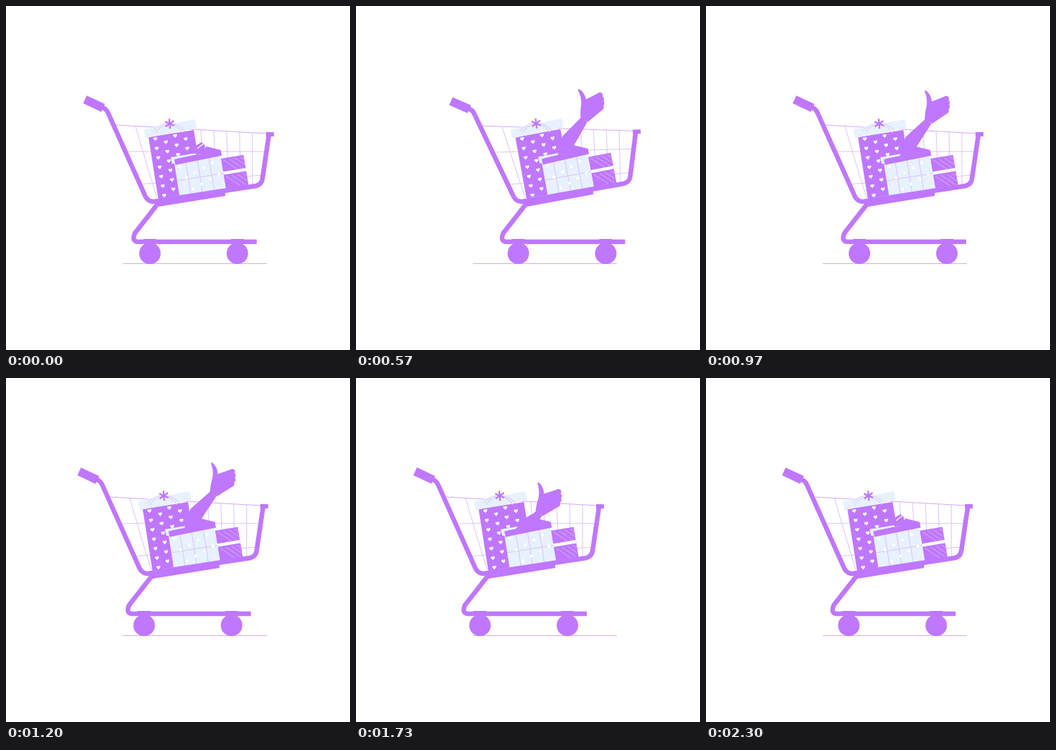
An HTML page with a canvas that plays this animation: 480x480 px, repeating every 2330 ms.

```html
<!DOCTYPE html>
<html lang="en">
<head>
<meta charset="utf-8">
<title>Shopping cart</title>
<style>
  html, body { margin: 0; width: 100%; height: 100%; overflow: hidden; background: #fff; }
  canvas { display: block; width: 100vw; height: 100vh; }
</style>
</head>
<body>
<canvas id="stage" width="480" height="480"></canvas>
<script>
const LOOP = 2330;
const LEFT_STOP = 169, ROLL = 60.3, ROLL_BACK = 661, ROLL_OUT = 1606;
const PURPLE = '#bf77ff', PALE = '#e7f1ff', LILAC = '#dcc4fb', WIRE = '#d5a8fd', WHITE = '#fff';
const ctx = document.getElementById('stage').getContext('2d');

// Motion

const progress = (t, start, end) => Math.min(1, Math.max(0, (t - start) / (end - start)));
const smooth = u => u * u * (3 - 2 * u);
const mix = (a, b, u) => a + (b - a) * u;
const bump = (t, peak, reach) =>
  Math.abs(t - peak) < reach ? Math.cos((t - peak) / reach * Math.PI / 2) ** 2 : 0;

function cartX(t) {
  if (t >= ROLL_BACK && t < ROLL_OUT)
    return LEFT_STOP + ROLL * (1 - smooth(progress(t, ROLL_BACK, ROLL_OUT)));
  const u = progress(t < ROLL_BACK ? t + LOOP : t, ROLL_OUT, LOOP + ROLL_BACK);
  return LEFT_STOP + ROLL * mix(u, smooth(u), 0.35);
}

const cartTilt = t => 2.8 * bump(t, 1970, 260) - 1.35 * bump(t, 570, 240);
const cartDip = t => 1.4 * bump(t, 330, 220);
const armSink = t =>
  1 - smooth(progress(t, 60, 280)) - 0.03 * bump(t, 330, 150) + smooth(progress(t, 1650, 1900));
const armSwing = t => mix(-4, 5, smooth(progress(t, 300, 1500)));

// Drawing helpers

function fill(d, color = PURPLE) {
  ctx.fillStyle = color;
  ctx.fill(new Path2D(d));
}

function stroke(d, width = 1, color = LILAC) {
  ctx.strokeStyle = color;
  ctx.lineWidth = width;
  ctx.stroke(new Path2D(d));
}

function line(x1, y1, x2, y2, width, color) {
  stroke(`M${x1} ${y1} L${x2} ${y2}`, width, color);
}

function rect(x, y, w, h, color = PURPLE) {
  ctx.fillStyle = color;
  ctx.fillRect(x, y, w, h);
}

function disc(x, y, r, color = PURPLE) {
  ctx.fillStyle = color;
  ctx.beginPath();
  ctx.arc(x, y, r, 0, Math.PI * 2);
  ctx.fill();
}

function placed(x, y, degrees, paint) {
  ctx.save();
  ctx.translate(x, y);
  ctx.rotate(degrees * Math.PI / 180);
  paint();
  ctx.restore();
}

function turnAround(x, y, degrees) {
  ctx.translate(x, y);
  ctx.rotate(degrees * Math.PI / 180);
  ctx.translate(-x, -y);
}

function heart(x, y) {
  disc(x - 1.3, y - 0.8, 1.5, WHITE);
  disc(x + 1.3, y - 0.8, 1.5, WHITE);
  fill(`M${x - 2.6} ${y - 0.2} h5.2 l-2.6 3 Z`, WHITE);
}

// Cart

function drawBase() {
  stroke('M211 276 L179 317 Q174 329 184 329 H349', 6.5, PURPLE);
  for (const x of [200, 322]) {
    rect(x - 9, 325, 18, 7);
    disc(x, 345.2, 15);
  }
}

function drawWires() {
  line(152, 166, 364, 178, 1, WIRE);
  line(169, 203, 361, 203);
  line(188, 248.5, 358, 236);
  stroke('M180 168 Q192 210 210 268');
  for (let i = 0; i < 5; i++) line(271 + 18 * i, 173 + i, 277 + 16.5 * i, 260 - 2.5 * i);
}

function drawFrame() {
  stroke('M131 141 Q139 142 142 150 L192 262 Q196 273 205 273 L348 251 Q356 249 357 241 L366 180', 6.5, PURPLE);
  rect(362, 176, 11, 6);
  fill('M206 270 L305 256 V265 L212 280 Z');
  placed(122, 136.3, 25, () => rect(-14, -6, 28, 12));
}

// Gifts

function drawHeartBox() {
  placed(198, 183, -9, () => {
    rect(0, 0, 64, 87);
    for (let col = 0; col < 4; col++)
      for (let y = 4 + (col % 2) * 6.7; y < (col < 2 ? 84 : 32); y += 13.3) heart(9 + col * 14, y);
  });
  placed(191.5, 172, -11, () => rect(0, 0, 73, 12.5, PALE));
  for (const side of [-1, 1]) {
    stroke(`M227 165 q${side * 13} 2 ${side * 19} 12`);
    stroke(`M227 165 q${side * 11} -3 ${side * 23} 10`);
  }
  for (let i = 0; i < 6; i++) placed(227.5, 164.3, 60 * i + 25, () => line(0, 0, 7, 0, 2.3, PURPLE));
}

function drawArm(sink, swing) {
  if (sink > 0.98) return;
  ctx.save();
  ctx.clip(new Path2D('M190 40 H420 L303 203 L234 215 Z'));
  ctx.translate(-60 * sink, 110 * sink);
  turnAround(272, 205, swing * 0.4);
  fill('M291 158 L264 183 L255 215 H274 L278 199 L300 164 Z');
  turnAround(296, 160, swing * 0.6);
  fill('M290.5 159 Q291 146 293 139 Q294 129 290 120 Q289 116 293 119 Q299 124 300 133 L319 125 L322 149 L301 164 Z');
  for (let i = 0; i < 4; i++) disc(320 + 1.5 * Math.sin(i), 128.5 + 5.6 * i, 3.8);
  ctx.restore();
}

function drawStripedBox() {
  placed(299, 213, -9.5, () => {
    rect(0, 0, 32, 44);
    for (const y of [2, 25])
      for (let x = 3; x < 28; x += 8) line(x, y, Math.min(x + 18, 31), y + Math.min(18, 31 - x) * 0.95, 0.7);
    rect(0, 18.5, 32, 4.4, WHITE);
  });
}

function drawOpenBox() {
  placed(234, 219, -9, () => {
    rect(0, 0, 65, 46.5, PALE);
    line(0, 25, 65, 25);
    for (let x = 16; x < 60; x += 16.5) line(x, 0, x, 46);
    for (let i = 0; i < 9; i++) disc(7 + 6.5 * i, 6 + (i * 17) % 39, 2.1, WHITE);
  });
  placed(234, 214, -11.5, () => rect(0, 0, 66, 8));
}

function drawRibbon() {
  fill('M229 211 L272 204 V206 L238 213 L236 220 H231 Z', PALE);
  fill('M261 197 L272 190 L279 196 L299 201 L298 206 L264 207 Z');
  line(266, 199, 275, 192, 1.3, WHITE);
  line(277.5, 190, 277.5, 198, 1.3, WHITE);
}

function draw(t) {
  rect(0, 0, 480, 480, WHITE);
  line(163, 359.5, 364, 359.5, 1, WIRE);

  ctx.save();
  ctx.translate(cartX(t) - 200, 0);
  drawBase();
  ctx.translate(0, cartDip(t));
  turnAround(208, 275, cartTilt(t));
  drawWires();
  drawHeartBox();
  drawRibbon();
  drawArm(armSink(t), armSwing(t));
  drawStripedBox();
  drawOpenBox();
  drawFrame();
  ctx.restore();
}

function tick() {
  draw(performance.now() % LOOP);
  requestAnimationFrame(tick);
}
tick();
</script>
</body>
</html>
```
